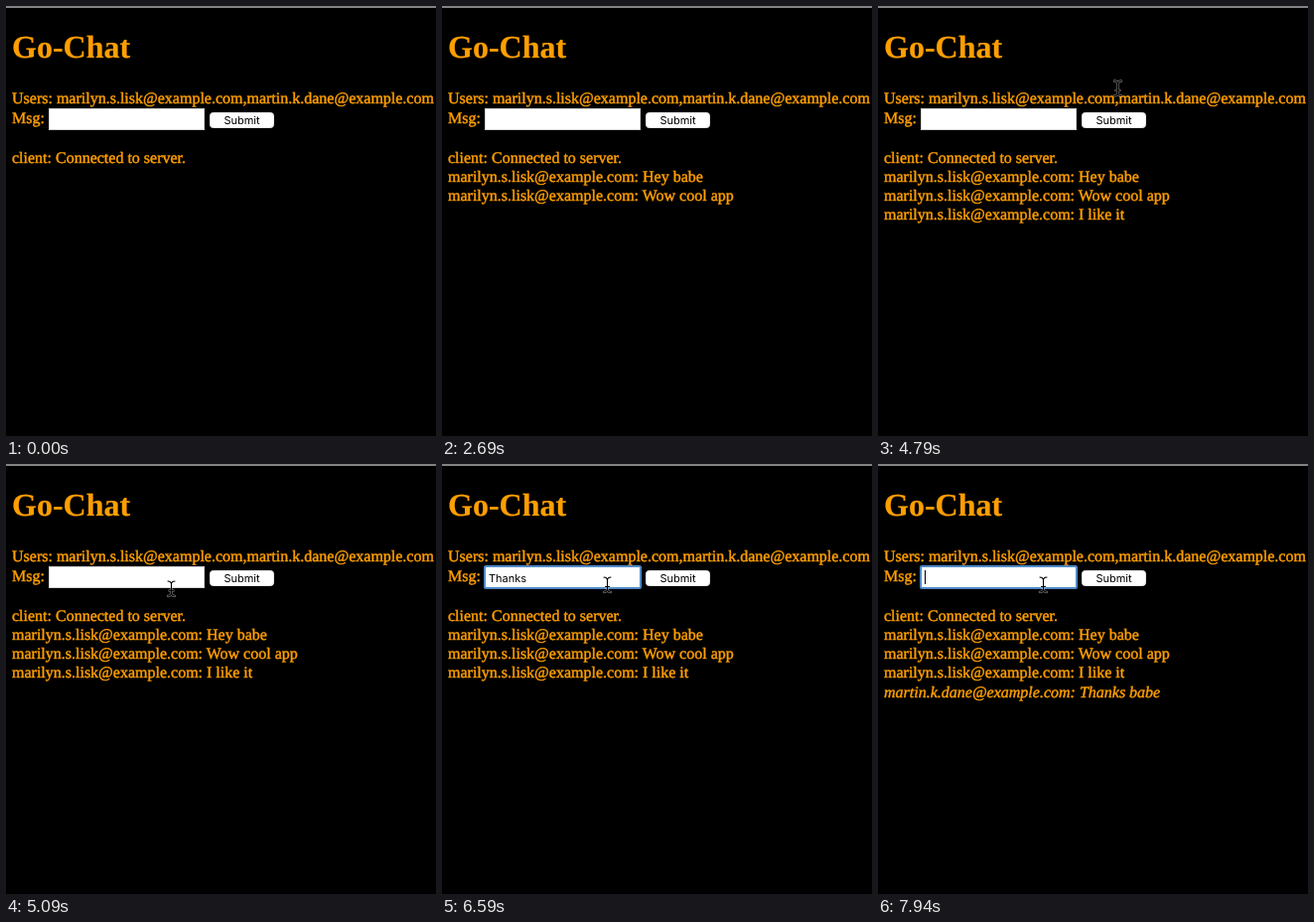
An HTML page that plays this animation: 433 by 433 pixels, repeating every 8 s.

```html
<!DOCTYPE html>
<html lang="en">
<head>
<meta charset="utf-8">
<title>Go-Chat</title>
<style>
  html, body { margin: 0; width: 100%; height: 100%; overflow: hidden; background: #000; }
  svg { display: block; width: 100%; height: 100%; }
  text { white-space: pre; text-rendering: geometricPrecision; }
  .page { font: 16px "Liberation Serif", serif; fill: #ff9f00; stroke: #ff9f00; stroke-width: .45px; }
  .title { font-size: 32px; font-weight: bold; stroke-width: .2px; }
  .own { font-style: italic; }
  .control { font: 11px Inter, sans-serif; fill: #000; }
</style>
</head>
<body>
<svg viewBox="0 0 433 433">
  <defs>
    <path id="beam" d="M1.5 1.5Q4.5 1.5 5 4Q5.5 1.5 8.5 1.5M5 4V14M3 11H7M1.5 16.5Q4.5 16.5 5 14Q5.5 16.5 8.5 16.5"/>
  </defs>
  <rect width="433" height="433"/>
  <rect width="433" height="2" fill="#848484"/>
  <g class="page" id="page">
    <text class="title" x="6" y="52">Go-Chat</text>
    <text x="6" y="118">Msg:</text>
  </g>

  <rect x="43" y="103" width="157" height="22" fill="#fff"/>
  <rect id="border" x="43.5" y="103.5" width="156" height="21" fill="none" stroke="#d4d4d4"/>
  <rect id="ring" x="43" y="103" width="157" height="22" rx="1" fill="none" stroke="#4f8ac6" stroke-width="2"/>
  <text class="control" id="typed" x="47" y="119"></text>
  <rect id="caret" y="107" width="1" height="14"/>

  <rect x="205.5" y="107.5" width="64" height="15" rx="3" fill="#fff" stroke="#e6e6e6"/>
  <text class="control" x="237.5" y="119" text-anchor="middle">Submit</text>

  <g id="pointer" fill="none" stroke-linecap="round">
    <use href="#beam" stroke="#fff" stroke-opacity=".45" stroke-width="2.4"/>
    <use href="#beam" stroke="#000" stroke-width="1.1"/>
  </g>
</svg>
<script>
  const LOOP = 8000;
  const ANN = 'marilyn.s.lisk@example.com';
  const BEN = 'martin.k.dane@example.com';
  const el = id => document.getElementById(id);

  function addLine(y, content, className = '') {
    const line = document.createElementNS('http://www.w3.org/2000/svg', 'text');
    line.setAttribute('x', 6);
    line.setAttribute('y', y);
    line.setAttribute('class', className);
    line.textContent = content;
    el('page').append(line);
    return line;
  }

  addLine(98, `Users: ${ANN},${BEN}`);
  const messages = [
    [0, 'client: Connected to server.'],
    [600, `${ANN}: Hey babe`],
    [2690, `${ANN}: Wow cool app`],
    [4340, `${ANN}: I like it`],
    [7940, `${BEN}: Thanks babe`, 'own']
  ].map(([start, content, className], i) =>
    ({ start, node: addLine(158 + 19.15 * i, content, className) }));

  // start, x, y
  const pointerSteps = [
    [4640, 238.5, 74.5], [4790, 236.5, 74], [4940, 169.5, 124],
    [5090, 161.5, 116.5], [5390, 161.5, 112.5]
  ];

  // start, field content, caret visible
  const fieldSteps = [
    [5390, '', true], [5840, 'T', true], [5990, 'Tha', true],
    [6140, 'Thank', true], [6290, 'Thanks', true], [6440, 'Thanks ', true],
    [6590, 'Thanks ', false], [7040, 'Thanks b', true], [7190, 'Thanks ba', true],
    [7340, 'Thanks bab', true], [7490, 'Thanks babe', true],
    [7790, 'Thanks babe', false], [7940, '', true]
  ];

  const stepAt = (steps, t) => steps.filter(([start]) => start <= t).pop();
  const show = (node, on) => node.setAttribute('visibility', on ? 'visible' : 'hidden');

  function draw(t) {
    messages.forEach(({ start, node }) => show(node, t >= start));

    const pointer = stepAt(pointerSteps, t);
    show(el('pointer'), pointer);
    if (pointer) el('pointer').setAttribute('transform', `translate(${pointer[1]} ${pointer[2]})`);

    const field = stepAt(fieldSteps, t);
    const [, content, caretOn] = field || [0, '', false];
    show(el('ring'), field);
    show(el('border'), !field);
    show(el('caret'), caretOn);
    el('typed').textContent = content;
    const width = content ? el('typed').getComputedTextLength() : 0;
    el('caret').setAttribute('x', Math.round(47 + width));
  }

  const origin = performance.now();
  function tick() {
    draw((performance.now() - origin) % LOOP);
    requestAnimationFrame(tick);
  }
  tick();
</script>
</body>
</html>
```
